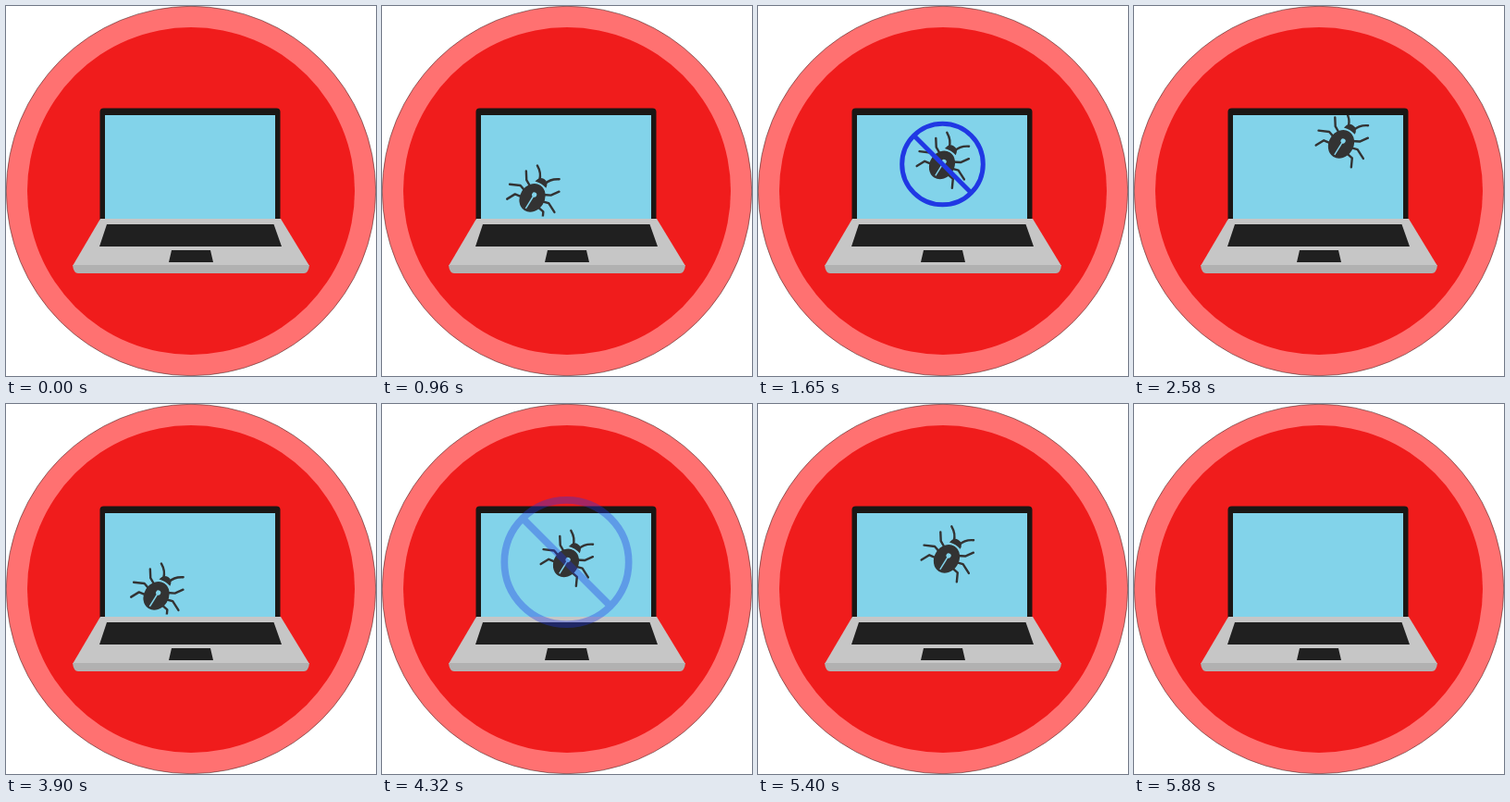
Write an HTML page that moves like this. It is 400 px wide and 400 px high and loops after 6.3 s.

```html
<!DOCTYPE html>
<html lang="en">
<head>
<meta charset="utf-8">
<title>Laptop bug</title>
<style>
  html, body { margin: 0; width: 100%; height: 100%; overflow: hidden; background: #fff; }
  svg { display: block; width: 100vw; height: 100vh; }
</style>
</head>
<body>
<svg viewBox="0 0 400 400">
  <defs>
    <clipPath id="screen"><path d="M107 118H292V227.5H107Z"/></clipPath>
    <g id="limbs" fill="none" stroke="#333" stroke-width="2.4" stroke-linecap="round" stroke-linejoin="round">
      <path d="M3.5 -19Q5.5 -27 14 -31.5"/>
      <path d="M8 -8L15.5 -12L21 -20"/>
      <path d="M10 -1L18 -3.5L28.5 1.5"/>
      <path d="M9 6L18 7.5L22.5 16.5"/>
    </g>
  </defs>

  <circle cx="200" cy="200" r="199.7" fill="#ff7171" stroke="#000" stroke-opacity=".6" stroke-width=".7"/>
  <circle cx="200" cy="200" r="177" fill="#f01c1c"/>

  <rect x="101.5" y="110.5" width="195" height="126" rx="4" fill="#1b1715"/>
  <path d="M107 118H291V231H107Z" fill="#82d3ea"/>
  <path d="M102 230H297L328 281H72Z" fill="#c6c6c6"/>
  <path d="M72 280H328Q327 289 322 289H78Q73 289 72 280Z" fill="#b1b1b1"/>
  <path d="M109 236H289.5L298 260H101Z M179 264H221L224 277H176Z" fill="#202020"/>

  <g clip-path="url(#screen)">
    <g id="bug">
      <use href="#limbs"/>
      <use href="#limbs" transform="scale(-1 1)"/>
      <path d="M-7 -15.8Q-6 -23 0 -23T7 -15.8Q0 -18 -7 -15.8Z" fill="#333"/>
      <ellipse cy="1" rx="13.3" ry="16" fill="#333"/>
      <circle cy="-3" r="2.6" fill="#82d3ea"/>
      <path d="M0 -3V14.5" stroke="#82d3ea" stroke-width="1.5"/>
    </g>
  </g>

  <g id="sign" fill="none" stroke="#2038e4" stroke-width="5">
    <circle r="43.8"/>
    <path d="M-31 -31L31 31"/>
  </g>
</svg>
<script>
  const LOOP = 6300, CYCLE = 2940, STEP = 30;
  const CENTER = { x: 199.5, y: 171 };
  const bug = document.getElementById('bug');
  const sign = document.getElementById('sign');
  const clamp = v => Math.min(1, Math.max(0, v));

  // Bug: straight in from the lower left, rest, straight out to the upper right.
  function drawBug(t) {
    const before = Math.max(0, 1230 - t) / STEP;
    const after = Math.max(0, t - 2430) / STEP;
    const x = CENTER.x - 4.05 * before + 5 * after;
    const y = CENTER.y + 3.95 * before - 4.5 * after;
    bug.setAttribute('transform', `translate(${x} ${y}) rotate(32)`);
    bug.style.display = t >= 600 && t < CYCLE ? '' : 'none';
  }

  // Sign: shrinks into place while fading in, grows while fading out.
  function drawSign(t) {
    const shrink = clamp((t - 1230) / 420);
    const leave = clamp((t - 2250) / 180);
    const scale = 1 + 0.83 * (1 - shrink) + 0.36 * leave;
    sign.setAttribute('transform', `translate(${CENTER.x} ${CENTER.y}) scale(${scale})`);
    sign.style.opacity = shrink * (1 - leave);
  }

  function frame() {
    const time = performance.now() % LOOP;
    const t = Math.floor((time % CYCLE) / STEP) * STEP;
    drawBug(t);
    drawSign(t);
    requestAnimationFrame(frame);
  }
  frame();
</script>
</body>
</html>
```
